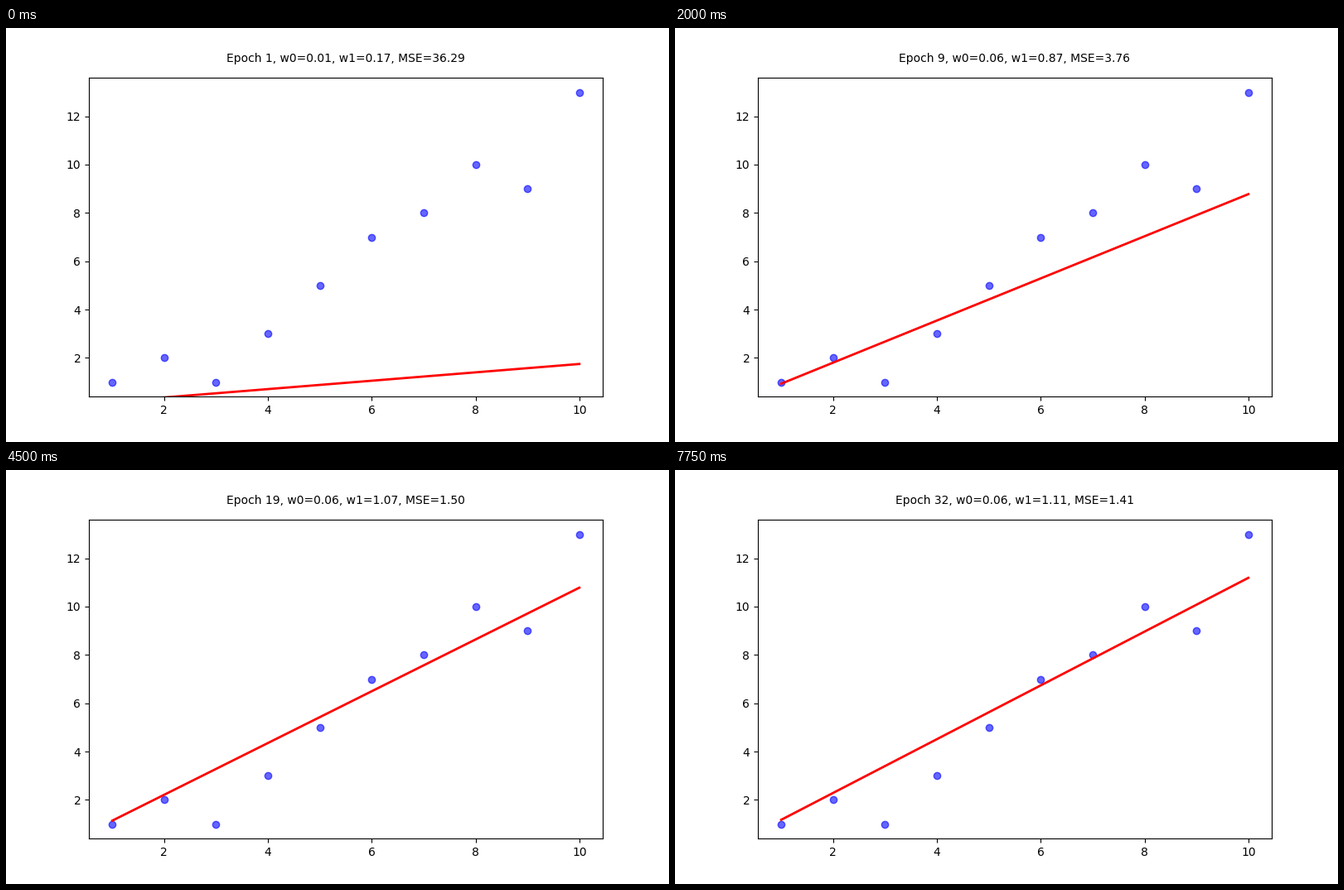
A matplotlib script for the animation above (8 s loop, 800 by 500 pixels).

```python
import numpy as np
import matplotlib.pyplot as plt
from matplotlib.animation import FuncAnimation

EPOCHS = 32
RATE_W0, RATE_W1 = 0.002, 0.004

x = np.arange(1, 11)
y = np.array([1, 2, 1, 3, 5, 7, 8, 10, 9, 13])


def descend():
    """Return (w0, w1, mse) after each epoch of gradient descent."""
    w0 = w1 = 0.0
    history = []
    for _ in range(EPOCHS):
        # the intercept moves first, the slope then sees the new intercept
        w0 += RATE_W0 * np.mean(y - w0 - w1 * x)
        w1 += RATE_W1 * np.mean((y - w0 - w1 * x) * x)
        history.append((w0, w1, np.mean((y - w0 - w1 * x) ** 2)))
    return history


history = descend()

plt.rcParams["font.family"] = "DejaVu Sans"
fig, ax = plt.subplots(figsize=(8, 5), dpi=100)
ax.scatter(x, y, color="blue", alpha=0.6)
ax.set_xlim(0.55, 10.45)
ax.set_ylim(0.4, 13.6)
line, = ax.plot([], [], color="red", lw=2)
title = ax.text(0.5, 1.05, "", transform=ax.transAxes, ha="center")


def update(i):
    w0, w1, mse = history[i]
    line.set_data(x, w0 + w1 * x)
    title.set_text(f"Epoch {i + 1}, w0={w0:.2f}, w1={w1:.2f}, MSE={mse:.2f}")
    return line, title


anim = FuncAnimation(fig, update, frames=EPOCHS, interval=250,
                     repeat=True, repeat_delay=0)
plt.show()
```
